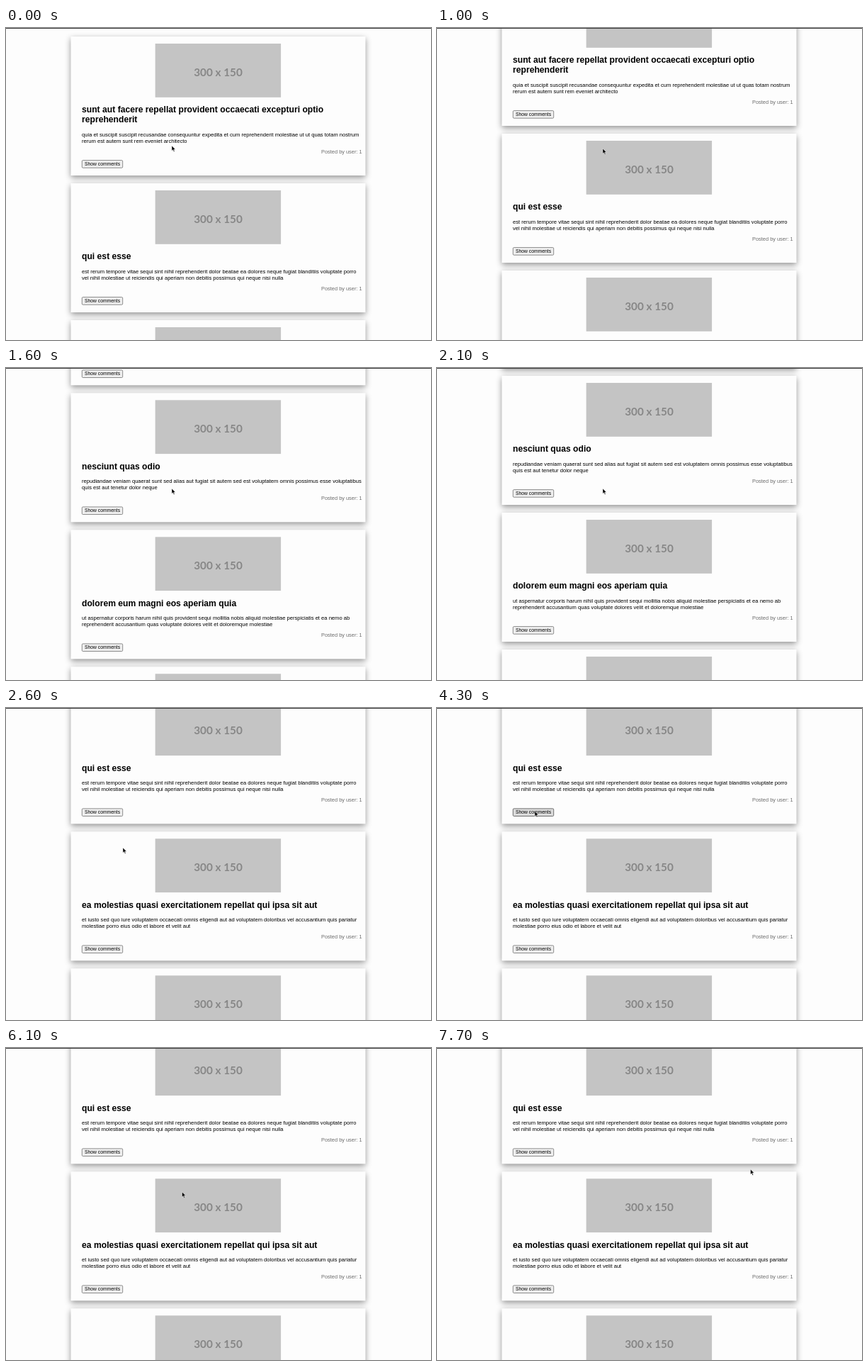
Recreate the animation shown at these times as an HTML page. Size 600 by 440 pixels, loop 8000 ms.

```html
<!DOCTYPE html>
<html lang="la">
<head>
<meta charset="utf-8">
<title>Posts</title>
<style>
  html, body { margin: 0; width: 100%; height: 100%; overflow: hidden; background: #fdfdfd; }
  svg { display: block; width: 600px; height: 440px; font-family: "Liberation Sans", Arial, sans-serif; }
  .card { fill: #fdfdfd; filter: drop-shadow(0 3px 4.4px rgba(0, 0, 0, .42)); }
  .image { fill: #c4c4c4; }
  .size { font: 700 15.3px Lato, sans-serif; fill: #878787; text-anchor: middle; }
  .title { font-size: 12.17px; font-weight: 700; }
  .body { font-size: 7.6px; }
  .name { font-size: 7.6px; font-weight: 700; }
  .author { font-size: 7.4px; fill: #6c6c6c; text-anchor: end; }
  .button { fill: #efefef; stroke: #707070; stroke-width: .8; }
  .label { font-size: 6.8px; text-anchor: middle; }
</style>
</head>
<body>
<svg id="stage" viewBox="0 0 600 440"></svg>
<script>
const LOOP = 8000, STEP = 100;
const LEFT = 107, LINE = 14, GAP = 11, HEIGHT = 182, EXTRA = 300;

const posts = [
  [["sunt aut facere repellat provident occaecati excepturi optio", "reprehenderit"],
   ["quia et suscipit suscipit recusandae consequuntur expedita et cum reprehenderit molestiae ut ut quas totam nostrum",
    "rerum est autem sunt rem eveniet architecto"]],
  [["qui est esse"],
   ["est rerum tempore vitae sequi sint nihil reprehenderit dolor beatae ea dolores neque fugiat blanditiis voluptate porro",
    "vel nihil molestiae ut reiciendis qui aperiam non debitis possimus qui neque nisi nulla"]],
  [["ea molestias quasi exercitationem repellat qui ipsa sit aut"],
   ["et iusto sed quo iure voluptatem occaecati omnis eligendi aut ad voluptatem doloribus vel accusantium quis pariatur",
    "molestiae porro eius odio et labore et velit aut"]],
  [["eum et est occaecati"],
   ["ullam et saepe reiciendis voluptatem adipisci sit amet autem assumenda provident rerum culpa quis hic commodi",
    "nesciunt rem tenetur doloremque ipsam iure quis sunt voluptatem rerum illo velit"]],
  [["nesciunt quas odio"],
   ["repudiandae veniam quaerat sunt sed alias aut fugiat sit autem sed est voluptatem omnis possimus esse voluptatibus",
    "quis est aut tenetur dolor neque"]],
  [["dolorem eum magni eos aperiam quia"],
   ["ut aspernatur corporis harum nihil quis provident sequi mollitia nobis aliquid molestiae perspiciatis et ea nemo ab",
    "reprehenderit accusantium quas voluptate dolores velit et doloremque molestiae"]],
  [["magnam facilis autem"],
   ["dolore placeat quibusdam ea quo vitae magni quis enim qui quis quo nemo aut saepe quidem repellat excepturi ut quia",
    "sunt ut sequi eos ea sed quas"]]
];

const comments = [
  ["et fugit eligendi deleniti quidem qui sint nihil autem",
   "doloribus at sed quis culpa deserunt consectetur qui praesentium accusamus fugiat dicta voluptatem rerum ut",
   "voluptate autem voluptatem repellendus aspernatur dolorem in"],
  ["repellat consequatur praesentium vel minus molestias voluptatum",
   "maiores sed dolores similique labore et inventore et quasi temporibus esse sunt id et eos voluptatem aliquam",
   "aliquid ratione corporis molestiae mollitia quia et magnam dolor"],
  ["et omnis dolorem",
   "ut voluptatem corrupti velit ad voluptatem maiores et nisi velit vero accusamus maiores voluptates quia",
   "aliquid ullam eaque"],
  ["provident id voluptas",
   "sapiente assumenda molestiae atque adipisci laborum distinctio aperiam et ab ut omnis et occaecati aspernatur",
   "odit sit rem expedita quas enim ipsam minus"],
  ["eaque et deleniti atque tenetur ut quo ut",
   "voluptate iusto quis nobis reprehenderit ipsum amet nulla quia quas dolores velit et non aut quia",
   "necessitatibus nostrum quaerat nulla et accusamus nisi facilis"]
];

// Motion as [time, value...] keys.
const scrollKeys = [[800, 0], [1000, 70], [1300, 385.3], [1600, 762.7], [1850, 832], [2100, 787], [2350, 480], [2600, 237.7]];
const cursorKeys = [
  [200, 234, 166], [400, 234, 170], [2300, 234, 170], [2600, 165, 197], [2900, 137, 146], [3000, 137, 146],
  [3100, 131, 141], [3200, 125, 146], [3300, 131, 150], [3400, 141, 146], [3500, 138, 145.5], [5000, 138, 145.5],
  [5300, 248.5, 203], [7100, 248.5, 203], [7500, 380, 147], [7700, 442.5, 171]
];

const stage = document.getElementById("stage");

function add(parent, tag, attrs, content) {
  const el = document.createElementNS("http://www.w3.org/2000/svg", tag);
  for (const key in attrs) el.setAttribute(key, attrs[key]);
  if (content) el.textContent = content;
  parent.appendChild(el);
  return el;
}

const text = (parent, cls, x, y, content) => add(parent, "text", { class: cls, x, y }, content);
const box = (parent, cls, x, y, width, height, rx = 0) =>
  add(parent, "rect", { class: cls, x, y, width, height, rx });

function makeCard(parent, [title, body]) {
  const root = add(parent, "g", {});
  const shift = (title.length - 1) * LINE;
  const height = HEIGHT + shift;
  const card = box(root, "card", 91.5, 0, 416, height);
  box(root, "image", 210.7, 10, 177.4, 75.8);
  text(root, "size", 299.5, 56.2, "300 x 150");
  title.forEach((line, i) => text(root, "title", LEFT, 107.3 + i * LINE, line));
  const lower = add(root, "g", { transform: `translate(0 ${shift})` });
  body.forEach((line, i) => text(lower, "body", LEFT, 126.9 + i * 8.6, line));
  text(lower, "author", 502.6, 151.2, "Posted by user: 1");
  const control = add(lower, "g", {});
  const button = box(control, "button", 107.3, 160.6, 57.4, 10.6, 1.3);
  text(control, "label", 136, 168.2, "Show comments");
  return { root, card, lower, control, button, height };
}

const list = add(stage, "g", {});
const cards = posts.map(post => makeCard(list, post));
const target = cards[1];
const thread = add(target.lower, "g", {});
comments.forEach((lines, n) => lines.forEach((line, i) =>
  text(thread, i ? "body" : "name", LEFT, 169 + n * 62 + (i ? 8 + i * 8.6 : 0), line)));

add(stage, "rect", { width: 600, height: 1, fill: "#3c3c3c" });
const cursor = add(stage, "path", {
  d: "M0 0V7.3L1.7 5.7L2.9 8.5L4.1 8L2.9 5.3H5.2Z",
  fill: "#000", stroke: "#fff", "stroke-width": .5
});

// Smooth curve through the keys that never overshoots them.
function sample(keys, t, c = 1) {
  const last = keys.length - 1;
  if (t <= keys[0][0]) return keys[0][c];
  if (t >= keys[last][0]) return keys[last][c];
  const slope = i => (keys[i + 1][c] - keys[i][c]) / (keys[i + 1][0] - keys[i][0]);
  const tangent = i => {
    if (i === 0 || i === last) return 0;
    const a = slope(i - 1), b = slope(i);
    return a * b > 0 ? 2 * a * b / (a + b) : 0;
  };
  const i = keys.findIndex(key => key[0] > t) - 1;
  const span = keys[i + 1][0] - keys[i][0];
  const u = (t - keys[i][0]) / span, v = 1 - u;
  return v * v * (1 + 2 * u) * keys[i][c] + u * u * (3 - 2 * u) * keys[i + 1][c]
    + span * u * v * (v * tangent(i) - u * tangent(i + 1));
}

const show = (el, on) => el.setAttribute("visibility", on ? "visible" : "hidden");
const move = (el, x, y) => el.setAttribute("transform", `translate(${x} ${y})`);

function render(t) {
  const open = t >= 4700 && t < 6100;
  const hover = t >= 4200 && t < 4700;

  let y = 12 - sample(scrollKeys, t);
  for (const item of cards) {
    const height = item.height + (open && item === target ? EXTRA : 0);
    item.card.setAttribute("height", height);
    move(item.root, 0, y);
    y += height + GAP;
  }

  show(thread, open);
  show(target.control, !open);
  target.button.style.fill = hover ? (t < 4300 ? "#e5e5e5" : "#dcdcdc") : "";
  target.button.style.stroke = hover ? "#4f4f4f" : "";
  move(cursor, sample(cursorKeys, t, 1), sample(cursorKeys, t, 2));
}

const start = performance.now();
function tick() {
  const t = (performance.now() - start) % LOOP;
  render(Math.floor(t / STEP) * STEP);
  requestAnimationFrame(tick);
}
tick();
</script>
</body>
</html>
```
